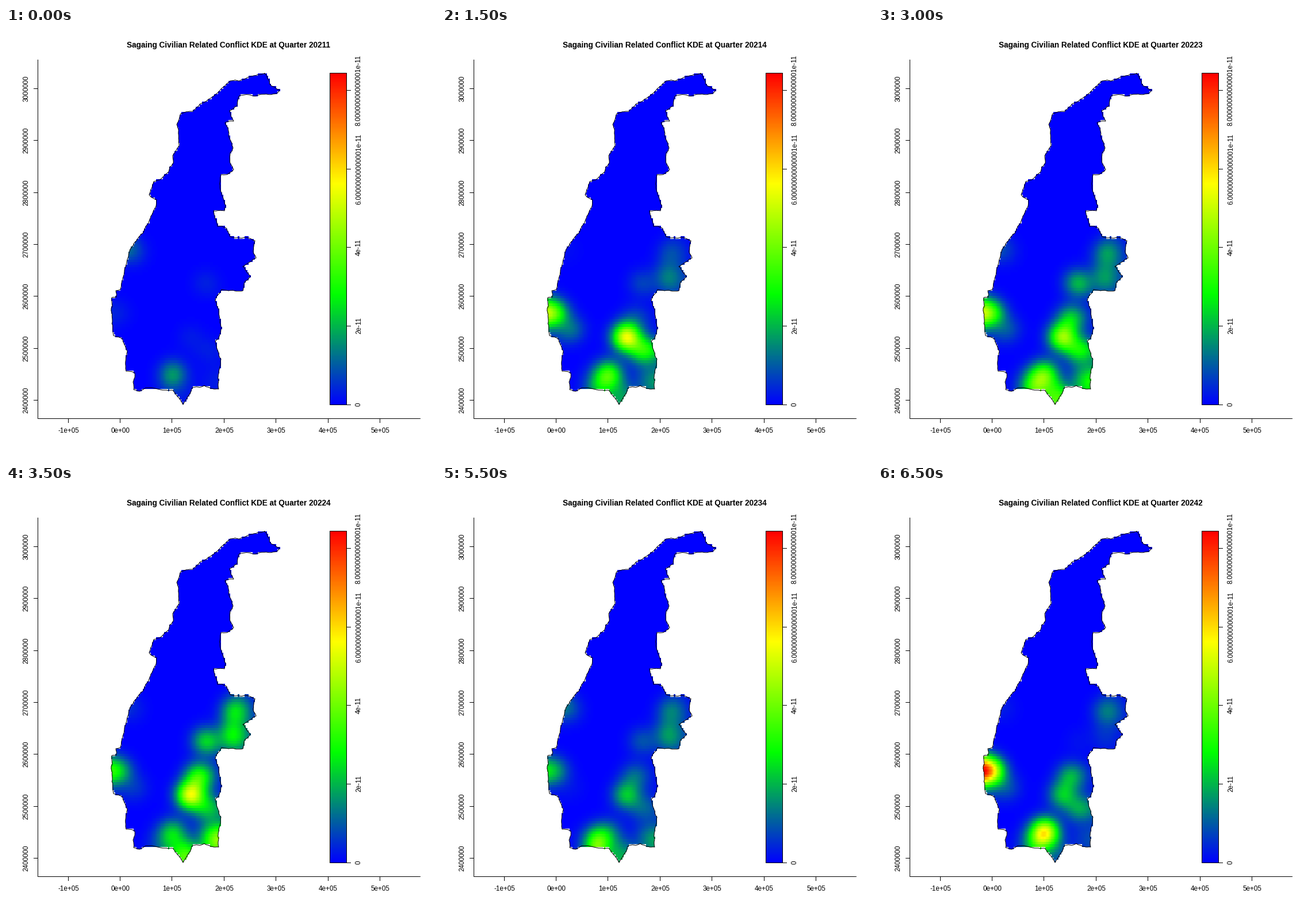
Write a matplotlib script that moves like this. It is 748x748 px and loops after 7 s.

```python
import numpy as np
import matplotlib.pyplot as plt
from matplotlib.animation import FuncAnimation
from matplotlib.colors import LinearSegmentedColormap
from matplotlib.path import Path
from matplotlib.patches import Rectangle

SIZE, FRAMES, N = 748, 14, 128
PX = 0.72      # points per pixel at 100 dpi
SPREAD = 17    # kernel width in pixels
plt.rcParams["font.family"] = "Liberation Sans"

# Corners of the region, from the northern tip down each side
WEST = [
    (450, 79), (427, 84), (390, 92), (370, 111), (343, 130), (325, 145),
    (304, 149), (297, 168), (301, 205), (290, 222), (291, 235), (268, 264),
    (257, 267), (249, 290), (262, 299), (261, 310), (243, 345), (222, 375),
    (209, 412), (199, 455), (191, 457), (192, 468), (184, 469), (183, 490),
    (187, 535), (203, 541), (211, 562), (209, 597), (224, 600), (222, 629),
    (232, 632), (243, 626), (290, 630), (308, 655)]
EAST = [
    (461, 100), (476, 108), (472, 113), (422, 116), (407, 117), (402, 135),
    (389, 144), (396, 162), (381, 165), (388, 190), (395, 209), (390, 217),
    (390, 235), (396, 246), (384, 255), (374, 255), (374, 285), (382, 308),
    (380, 318), (361, 318), (368, 345), (383, 348), (390, 363), (418, 364),
    (433, 370), (430, 390), (435, 400), (412, 415), (425, 432), (415, 442),
    (412, 457), (387, 457), (375, 455), (364, 474), (370, 490), (370, 540),
    (364, 545), (372, 590), (370, 628), (345, 622), (325, 625), (313, 647)]

# Each site keeps its place; its strength (percent of the scale) runs
# through the key quarters.
KEYS = [0, 3, 5, 7, 9, 11, 13]
SITES = {
    (290, 602): [19, 36, 48, 24, 38, 12, 62],
    (270, 615): [0, 12, 40, 6, 18, 32, 12],
    (310, 632): [1, 9, 18, 20, 9, 10, 4],
    (196, 496): [3, 36, 50, 24, 32, 19, 62],
    (225, 525): [0, 13, 14, 6, 1, 2, 9],
    (320, 538): [3, 62, 38, 60, 42, 25, 24],
    (348, 562): [3, 30, 34, 20, 25, 10, 18],
    (335, 505): [0, 8, 15, 35, 22, 13, 22],
    (358, 608): [2, 10, 10, 27, 34, 11, 5],
    (347, 444): [4, 8, 19, 27, 6, 10, 2],
    (392, 432): [0, 14, 6, 27, 18, 17, 5],
    (397, 393): [0, 9, 10, 27, 19, 15, 15],
    (222, 390): [7, 1, 7, 3, 1, 8, 2],
}

rng = np.random.default_rng(4)


def rough(a, b):
    """Points from a up to b, with shaken midpoints."""
    length = np.hypot(*(b - a))
    if length < 4:
        return [a]
    mid = (a + b) / 2 + rng.normal(0, .05 * length, 2)
    return rough(a, mid) + rough(mid, b)


corners = np.array(WEST + EAST[::-1], float)
border = np.array([p for a, b in zip(corners, np.roll(corners, -1, axis=0))
                   for p in rough(a, b)])
(left, top), (right, bottom) = border.min(axis=0), border.max(axis=0)
dx, dy = (right - left) / N, (bottom - top) / N
xs = left + (np.arange(N) + .5) * dx
ys = top + (np.arange(N) + .5) * dy
grid = np.stack(np.meshgrid(xs, ys), axis=-1)
inside = Path(border).contains_points(grid.reshape(-1, 2)).reshape(N, N)


def bell(d):
    return np.exp(-d ** 2 / (2 * SPREAD ** 2))


# Edge correction: share of the kernel that falls inside the region
mass = (bell(ys[:, None] - ys) @ inside @ bell(xs[:, None] - xs)
        * dx * dy / (2 * np.pi * SPREAD ** 2))


def field(i):
    """Edge-corrected kernel density of quarter i."""
    total = sum(np.interp(i, KEYS, level) / 100
                * np.outer(bell(ys - y), bell(xs - x))
                for (x, y), level in SITES.items())
    return np.ma.masked_where(~inside, total / np.maximum(mass, .05))


fig = plt.figure(figsize=(SIZE / 100, SIZE / 100), dpi=100, facecolor="white")
ax = fig.add_axes([0, 0, 1, 1])
ax.axis("off")
cmap = LinearSegmentedColormap.from_list(
    "heat", ["blue", "lime", "yellow", "red"], N=256)


def line(x, y):
    ax.plot(np.add(x, .5), np.add(y, .5), color="black", lw=PX, snap=False,
            solid_capstyle="projecting")


def label(x, y, s, turn=0, px=11.6, **kw):
    return ax.text(x, y, s, fontsize=px * PX, rotation=turn, ha="center",
                   va="center", **kw)


def image(data, box):
    return ax.imshow(data, cmap=cmap, vmin=0, vmax=1, aspect="auto",
                     interpolation="nearest", extent=box)


heat = image(field(0), (left, right, bottom, top))
ax.plot(*np.vstack([border, border[:1]]).T, color="black", lw=PX, snap=False)

# Axes
line([55, 55], [55, 679])
line([55, 720], [679, 679])
for k in range(-1, 6):
    x = round(198 + 90.4 * k)
    line([x, x], [679, 686])
    label(x + .5, 700.5, f"{k}e+05" if k else "0e+00")
for k in range(7):
    y = round(647 - 90.35 * k)
    line([48, 55], [y, y])
    label(35.5, y, str(2400000 + 100000 * k), 90)

# Colour bar
image(np.linspace(1, 0, 256)[:, None], (563.5, 592.5, 656, 78))
ax.add_patch(Rectangle((563.5, 78.5), 29, 577, fill=False, ec="black",
                       lw=PX, snap=False))
for k in range(5):
    y = round(655 - 136.8 * k)
    zeros = "." + "0" * 13 + "1" if k > 2 else ""
    line([592, 599], [y, y])
    label(614, y, f"{2 * k}{zeros}e-11" if k else "0", 90)

title = label(387.5, 29.5, "", px=13.6, weight="bold")
ax.set_xlim(0, SIZE)
ax.set_ylim(SIZE, 0)


def draw(i):
    heat.set_data(field(i))
    title.set_text("Sagaing Civilian Related Conflict KDE at Quarter "
                   f"{2021 + i // 4}{i % 4 + 1}")
    return heat, title


anim = FuncAnimation(fig, draw, frames=FRAMES, interval=500, repeat=True,
                     repeat_delay=0, init_func=lambda: draw(0))
plt.show()
```
